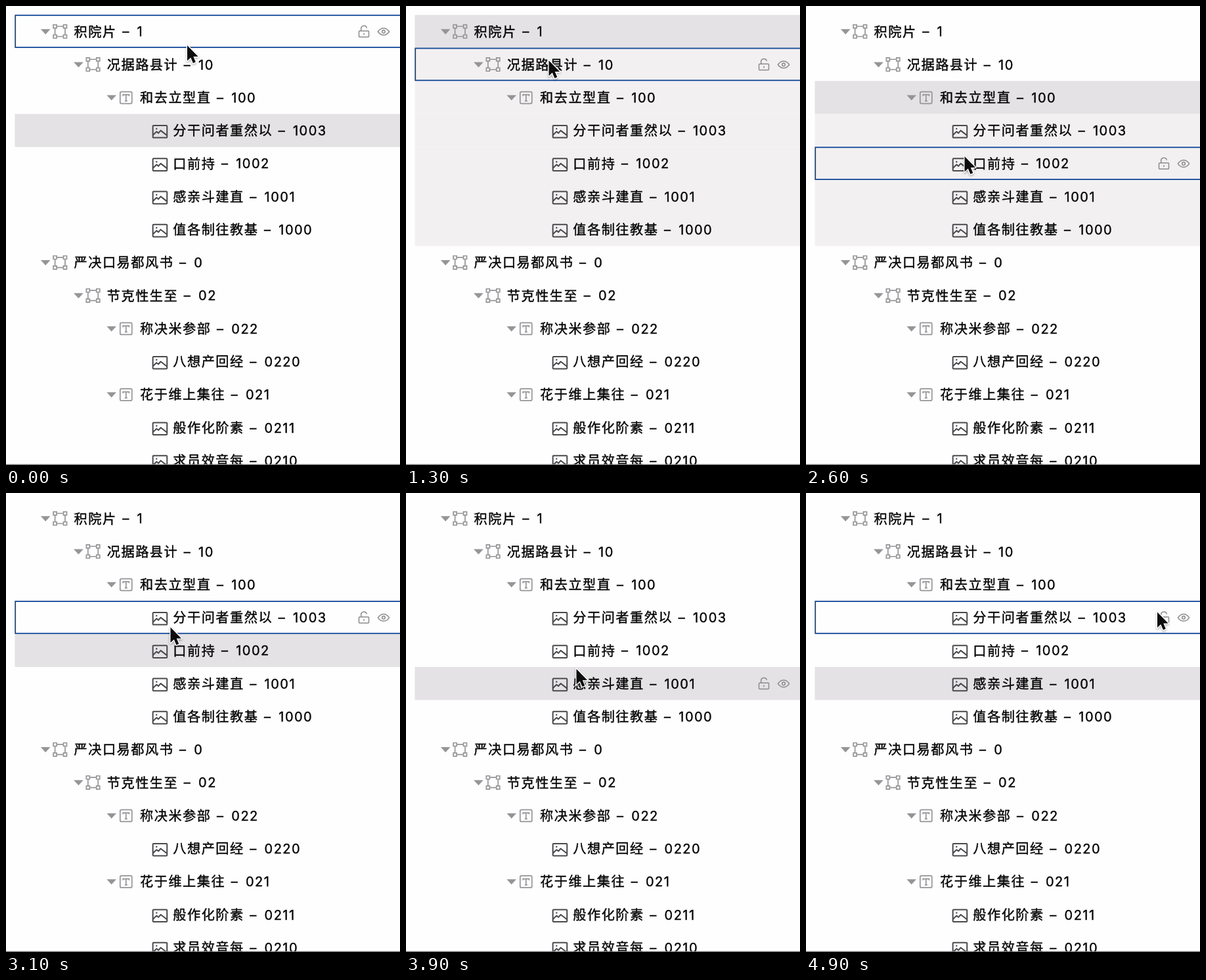
An HTML page for the animation above (5 s loop, 600 px wide and 699 px high).

```html
<!DOCTYPE html>
<html lang="zh-CN">
<head>
<meta charset="utf-8">
<title>Layer tree</title>
<style>
html, body { margin: 0; width: 600px; height: 699px; overflow: hidden; background: #fefefe; }
svg { display: block; }
text { fill: #050505; stroke: #050505; stroke-width: .4px; letter-spacing: 1.5px; }
.name { font: 400 20.2px "Noto Sans CJK SC", sans-serif; }
.id { font: 400 20px Inter, sans-serif; }
.line { fill: none; stroke: #969498; stroke-width: 1.7; }
.dark { fill: none; stroke: #4a484c; stroke-width: 2; stroke-linejoin: round; }
.thin { fill: none; stroke: #8c8a8d; stroke-width: 1.5; }
</style>
</head>
<body>
<svg width="600" height="699" viewBox="0 0 600 699">
  <defs>
    <filter id="shadow" x="-50%" y="-50%" width="200%" height="200%">
      <feDropShadow dx="0" dy="1.5" stdDeviation="1.5" flood-color="#000" flood-opacity=".35"/>
    </filter>
    <g id="group" class="line">
      <path d="M-5-8H5M-5 7.5H5M-7.7-5V5M7.7-5V5"/>
      <path d="M-10.2-10.4h5v5h-5zM5.2-10.4h5v5h-5zM-10.2 5h5v5h-5zM5.2 5h5v5h-5z"/>
    </g>
    <g id="text" class="line">
      <rect x="-9" y="-9" width="18" height="18" rx="2"/>
      <path d="M-4.6-2.2V-4.4H4.6V-2.2M0-4.4V5M-2 5H2"/>
    </g>
    <g id="image" class="dark">
      <rect x="-10.8" y="-8.3" width="21.6" height="18.6" rx="1.2"/>
      <path d="M-10.8 6.4L-5.1 1L-2.3 3.3L1.1-.7L10.8 6.8"/>
      <circle cx="-5.2" cy="-3.4" r="1.2" fill="#4a484c" stroke="none"/>
    </g>
    <g id="tools" class="thin">
      <rect x="537.5" y="-1" width="15" height="9.2" rx="1"/>
      <path d="M540.7-1V-4.5a4.4 4.4 0 0 1 8.7-.9M545 2.2v2.8"/>
      <path d="M575 5.3C580 5.3 583.6 0 583.6 0S580-5.3 575-5.3 566.4 0 566.4 0 570 5.3 575 5.3z"/>
      <circle cx="575" cy="0" r="2.3"/>
    </g>
  </defs>
  <g id="fills"></g>
  <g id="rows"></g>
  <use id="icons" href="#tools"/>
  <rect id="outline" x="14.2" width="620" height="48.8" fill="none" stroke="#11489a" stroke-width="1.8"/>
  <rect y="697.7" width="600" height="1.3" fill="#777578"/>
  <path id="cursor" d="M0 0V23.6L5.3 18.6L8.9 27L12.8 25.3L9.3 17H16.6Z" fill="#0a0a0a"
    stroke="#fff" stroke-width="2.6" paint-order="stroke" stroke-linejoin="round" filter="url(#shadow)"/>
</svg>
<script>
const LOOP = 5000, TICK = 100, PITCH = 50.27, TOP = 13.6, MID = 39, ADVANCE = 21.7;

// An id's length gives the depth; a child's id starts with its parent's.
const tree = `积院片 1,况据路县计 10,和去立型直 100,分干问者重然以 1003,口前持 1002,感亲斗建直 1001,
值各制往教基 1000,严决口易都风书 0,节克性生至 02,称决米参部 022,八想产回经 0220,花于维上集往 021,
般作化阶素 0211,求员效音每 0210`.split(",").map(s => s.trim().split(" "));

// Pointer glides: when they begin and end, and where they lead
const start = { x: 276, y: 60 };
const glides = [
  { from: 0, to: 100, x: 256, y: 147 },
  { from: 200, to: 500, x: 218, y: 46.5 },
  { from: 1000, to: 1300, x: 217.5, y: 83 },
  { from: 1700, to: 2200, x: 223, y: 129 },
  { from: 2400, to: 2600, x: 241.5, y: 229 },
  { from: 3000, to: 3200, x: 259.5, y: 180 },
  { from: 3500, to: 3900, x: 259.5, y: 268 },
  { from: 4000, to: 4300, x: 350, y: 150 },
  { from: 4300, to: 4900, x: 535, y: 181.5 }
];
const clicks = [800, 1600, 2200, 2800, 3400, 3900];
const FIRST_SELECTED = 3;

const $ = id => document.getElementById(id);
const add = (parent, tag, attrs, text = "") => {
  const el = document.createElementNS("http://www.w3.org/2000/svg", tag);
  for (const key in attrs) el.setAttribute(key, attrs[key]);
  el.textContent = text;
  parent.append(el);
  return el;
};
const icons = ["group", "group", "text", "image"];

const fills = tree.map(([name, id], i) => {
  const depth = id.length - 1, leaf = depth === 3, row = $("rows");
  const x = 103.5 + depth * 50.25, y = MID + i * PITCH, end = x + name.length * ADVANCE;
  if (!leaf) add(row, "path", { d: `M${x - 50.6} ${y - 3.8}h14.6l-7.3 8z`, fill: "#969498" });
  add(row, "use", { href: "#" + icons[depth], x: x - (leaf ? 19.8 : 21.2), y: y + (leaf ? .5 : 0) });
  add(row, "text", { class: "name", x, y: y + 7.5 }, name);
  add(row, "text", { class: "id", x: end + 8.6, y: y + 7.3 }, "–");
  add(row, "text", { class: "id", x: end + 30.8, y: y + 7.3 }, id);
  return add($("fills"), "rect", { x: 13.5, y: TOP + i * PITCH, width: 587, height: PITCH });
});

function pointer(t) {
  let { x, y } = start;
  for (const g of glides) {
    const p = Math.min(1, Math.max(0, (t - g.from) / (g.to - g.from)));
    const e = p * p * (3 - 2 * p);
    x += (g.x - x) * e;
    y += (g.y - y) * e;
  }
  return { x, y };
}

const rowAt = t => Math.floor((pointer(t).y - TOP) / PITCH);

function render(time) {
  const t = Math.floor(time / TICK) * TICK;
  const { x, y } = pointer(t), hover = rowAt(t);
  const click = clicks.findLast(c => c <= t);
  const selected = click === undefined ? FIRST_SELECTED : rowAt(click);
  fills.forEach((rect, i) => {
    const inside = tree[i][1].startsWith(tree[selected][1]);
    rect.setAttribute("fill", i === selected ? "#e4e2e4" : inside ? "#f2f0f1" : "none");
  });
  $("outline").setAttribute("y", TOP + hover * PITCH + .6);
  $("outline").setAttribute("visibility", hover === selected ? "hidden" : "visible");
  $("icons").setAttribute("y", MID + hover * PITCH);
  $("cursor").setAttribute("transform", `translate(${x} ${y})`);
}

function tick() {
  render(performance.now() % LOOP);
  requestAnimationFrame(tick);
}
tick();
</script>
</body>
</html>
```
